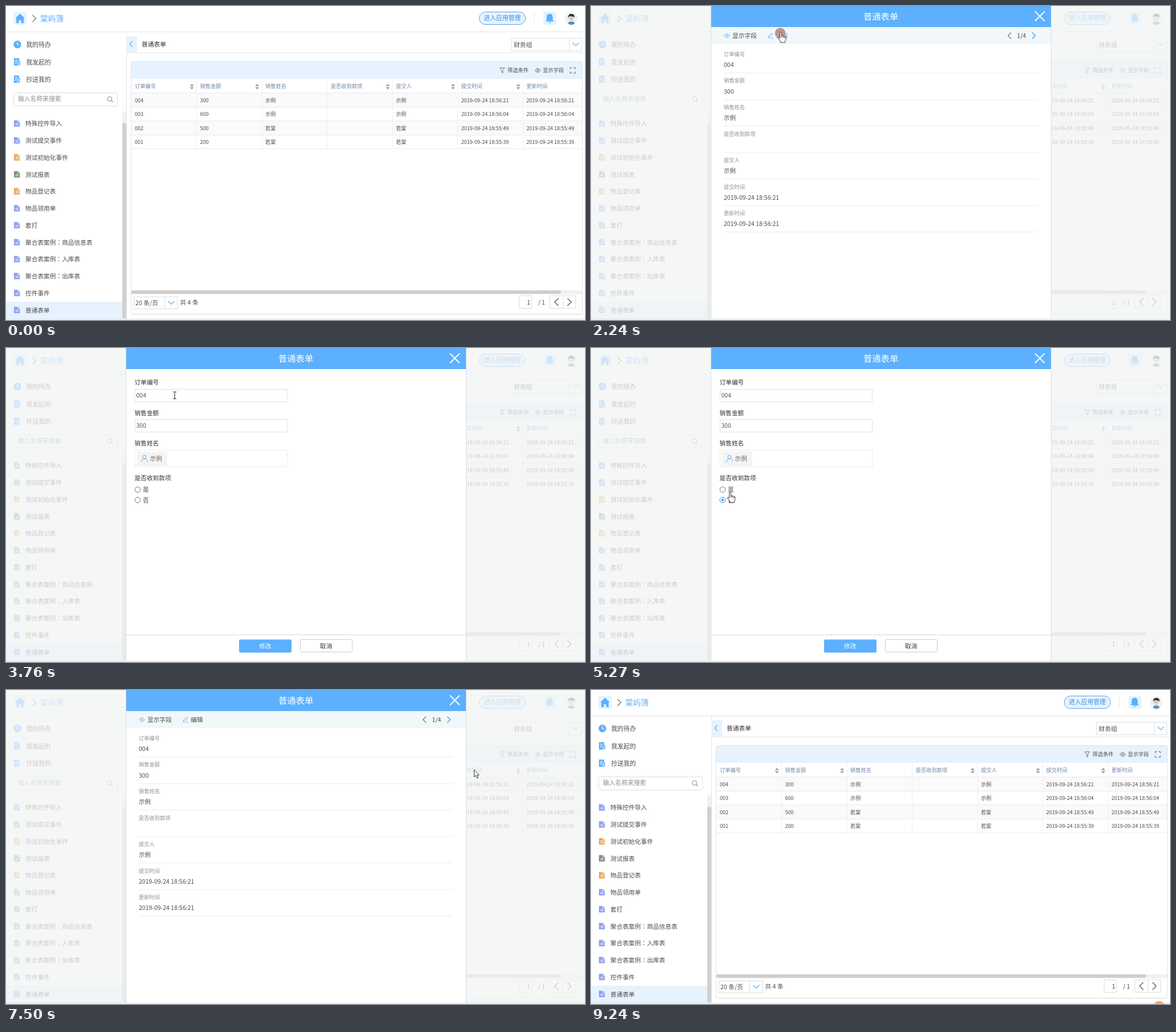
An HTML page that plays this animation: 1016 px wide and 551 px high, repeating every 9320 ms.

```html
<!DOCTYPE html>
<html lang="zh-CN">
<head>
<meta charset="utf-8">
<style>
html, body { margin: 0; width: 100%; height: 100%; overflow: hidden; background: #fff; }
svg { display: block; width: 1016px; height: 551px; font-family: "Noto Sans CJK SC", "Noto Sans CJK JP", "Noto Sans CJK", sans-serif; }
.mid { font-family: "Noto Sans CJK TC", "Noto Sans CJK", sans-serif; }
</style>
</head>
<body>
<svg id="stage" viewBox="0 0 1016 551"></svg>
<script>
const LOOP = 9320;
const BLUE = '#5cb0fe', PALE = '#e6f3fe', INK = '#4c4c4c', EDGE = '#dedede';

const rect = (x, y, w, h, fill, extra = '') =>
  `<rect x="${x}" y="${y}" width="${w}" height="${h}" fill="${fill}" ${extra}/>`;
const box = (x, y, w, h, stroke = EDGE, extra = '') =>
  rect(x + .5, y + .5, w - 1, h - 1, '#fff', `stroke="${stroke}" ${extra}`);
const path = (d, stroke, width = 1, fill = 'none', extra = '') =>
  `<path d="${d}" stroke="${stroke}" stroke-width="${width}" fill="${fill}" ${extra}/>`;
const solid = (d, fill) => path(d, 'none', 0, fill);
const circle = (x, y, r, fill, stroke = 'none', w = 1) =>
  `<circle cx="${x}" cy="${y}" r="${r}" fill="${fill}" stroke="${stroke}" stroke-width="${w}"/>`;
// y is the middle of the glyphs; the wide colon is centred in its cell
const text = (x, y, s, size = 10.7, fill = INK, extra = '') =>
  `<text x="${x}" y="${y + size * .37}" font-size="${size}" fill="${fill}" ${extra}>${
    s.replace('：', '<tspan class="mid" lang="zh-TW">：</tspan>')}</text>`;
const group = (x, y, body) => `<g transform="translate(${x} ${y})">${body}</g>`;
const hline = (x1, x2, y, color = '#ebebeb', extra = '') => path(`M${x1} ${y}H${x2}`, color, 1, 'none', extra);
const vline = (x, y1, y2, color = '#ebebeb') => path(`M${x} ${y1}V${y2}`, color);

const side = (x, y, dir, w, h, color, width = 1.2) =>
  path(`M${x - dir * w} ${y - h}L${x + dir * w} ${y}L${x - dir * w} ${y + h}`, color, width);
const down = (x, y) => path(`M${x - 5.5} ${y - 2.5}l5.5 5.5l5.5 -5.5`, BLUE, 1.2);
const eye = (x, y, color) =>
  path(`M${x - 5} ${y}q5 -7 10 0q-5 7 -10 0z`, color, .9) + circle(x, y, 1.6, 'none', color, .9);

function docIcon(y, kind) {
  const color = { form: '#8f9ff0', event: '#eca350', chart: '#83917f' }[kind];
  const marks = kind === 'chart'
    ? path('M3 9V7M5 9V4.5M7 9V6', '#fff', 1)
    : kind === 'event'
      ? path('M2.5 4.5H6M2.5 6.5H5M2.5 8.5H5', '#fff', .9) + circle(7.5, 7.2, 1.8, color, '#fff', .9)
      : path('M2.5 6H8M2.5 8.2H8', '#fff', .9);
  return group(14, y - 5.8, solid('M0 0H6.5V3.7H10.2V11.3H0Z', color) + solid('M7.4 0L10.2 2.9H7.4Z', color) + marks);
}

function topBar() {
  const house = solid('M24.5 13.5L33 21.5H31V30H26.5V25H22.5V30H18V21.5H16Z', BLUE);
  const bell = solid('M954 13.5c-3.8 0-5.4 3-5.4 6v5l-1.8 2.5h14.4l-1.8-2.5v-5c0-3-1.6-6-5.4-6z', BLUE) +
    solid('M951.5 28h5q-2.5 3.6-5 0z', BLUE);
  const face = circle(992, 22, 11, PALE) + solid('M986.2 31q.8-3.6 4-4h3.6q3.2.4 4 4q-5.8 3.8-11.6 0z', '#4d8fce') +
    rect(990.3, 24, 3.4, 4, '#f3c09e') + circle(992, 21.3, 4.8, '#fad2b4') +
    solid('M986.6 20.6q-.8-6.6 5.4-6.8q6.3.2 5.5 6.8l-1.4-2q-4 .3-5.9-1l-2.2 1.2z', '#353235') +
    circle(990.2, 21.6, .6, '#444') + circle(993.8, 21.6, .6, '#444');
  return hline(0, 1016, 45, '#e3e5e7') + hline(0, 1016, 46, '#f3f4f5') +
    rect(13, 10, 23, 23, PALE, 'rx="3"') + house +
    side(49.5, 22, 1, 3, 6, '#777', 1.3) + text(60, 22, '棠屿簿', 13.8, '#64b2fa') +
    rect(830.5, 10.5, 81, 22, PALE, 'rx="11" stroke="#559fe9"') +
    text(838.5, 21.5, '进入应用管理', 10.8, '#3c8de0') +
    vline(927, 11, 33, '#dceaf6') + rect(943, 10, 23, 23, PALE, 'rx="3"') + bell + face;
}

function sidebar() {
  const items = ['特殊控件导入', '测试提交事件', '测试初始化事件', '测试报表', '物品登记表', '物品领用单', '套打',
    '聚合表案例：商品信息表', '聚合表案例：入库表', '聚合表案例：出库表', '控件事件', '普通表单'];
  const kinds = { 2: 'event', 3: 'chart', 4: 'event' };
  const sheet = 'M14 0H23V5H25V13H14Z';
  const marks = path('M16 3.5H21M16 6H20M16 8.5H19', '#fff', 1);
  return vline(211.5, 46, 549, '#e2e4e6') +
    circle(20, 67.5, 6.7, BLUE) + path('M20 63.5V68H23.5', '#fff', 1.2) +
    group(0, 91.5, solid(sheet, BLUE) + marks + path('M23 7v6M20 10h6', '#fff', 3) + path('M23 7.5v5M20.5 10h5', BLUE, 1.3)) +
    group(0, 122, solid(sheet, BLUE) + marks + circle(22.5, 8.3, 2, BLUE, '#fff') + path('M19.5 13q3-4 6 0', '#fff', 1.2)) +
    ['我的待办', '我发起的', '抄送我的'].map((s, i) => text(35.5, 68.5 + i * 30.5, s, 10.8)).join('') +
    box(13, 152, 183, 24, EDGE, 'rx="2"') + text(21, 163.5, '输入名称来搜索', 10.8, '#8a8f94') +
    circle(181.8, 163, 4, 'none', '#888') + path('M184.8 166l2.8 2.8', '#888', 1.1) +
    rect(204, 185, 7, 364, '#f1f1f1') + rect(204, 205, 7, 343, '#d0d0d0', 'rx="3"') +
    rect(0, 519, 204, 30, PALE) +
    items.map((s, i) => {
      const y = 206.5 + i * 29.75;
      return docIcon(y - .3, kinds[i] || 'form') + text(34, y, s);
    }).join('');
}

function table() {
  const cols = ['订单编号', '销售金额', '销售姓名', '是否收到款项', '提交人', '提交时间', '更新时间'];
  const rows = [['004', '300', '示例', '56:21'], ['003', '600', '示例', '56:04'],
    ['002', '500', '若棠', '55:49'], ['001', '200', '若棠', '55:39']];
  const colX = i => 226 + i * 114.55;
  let s = rect(219.5, 97.5, 792, 443, '#fff', 'stroke="#e2e4e6" rx="2"') + hline(220, 1011, 541.5, '#eceeef') +
    rect(220, 98, 791, 30, PALE);
  s += path('M866.5 108.5h8.5l-3.3 4.3v5l-2-1.5v-3.5z', '#666', .9) + text(880, 113, '筛选条件', 9.25) +
    eye(933, 113, '#666') + text(942, 113, '显示字段', 9.25) +
    path('M990 111v-3h3M996 108h3v3M999 115v3h-3M993 118h-3v-3', '#666', 1);
  rows.forEach((r, i) => { if (i % 2 === 0) s += rect(220, 153 + i * 24.5, 791, 24, '#fafafa'); });
  for (let i = 0; i < 5; i++) s += hline(220, 1011, Math.round(152 + i * 24.5) + .5);
  cols.forEach((c, i) => {
    s += text(colX(i), 141, c, 9.25, '#6f86a6');
    if (i < 6) {
      const x = colX(i + 1) - 6.5;
      s += vline(Math.round(x) + .5, 128, 250, '#efefef');
      if (i !== 2) s += solid(`M${x - 11.5} 140.6l3.6-3.8l3.6 3.8zM${x - 11.5} 142.4l3.6 3.8l3.6-3.8z`, '#999');
    }
  });
  rows.forEach(([id, sum, name, time], i) => {
    const stamp = '2019-09-24 18:' + time;
    [id, sum, name, '', name, stamp, stamp].forEach((v, c) => { s += text(colX(c), 165.5 + i * 24.4, v, 9.05); });
  });
  return s;
}

function panel() {
  return rect(211, 53, 19, 28, PALE) + side(219.5, 67, -1, 2.5, 5, BLUE) +
    text(238, 67.5, '普通表单', 10.75, '#333') + hline(212, 1016, 82, '#e2e4e6') +
    box(887, 56, 124, 23) + vline(988.5, 56, 79, EDGE) + text(891, 68, '财务组') + down(1000, 67) +
    table() +
    rect(220, 499, 791, 7, '#f1f1f1') + rect(220, 499, 754, 6, '#cecece', 'rx="3"') +
    box(224, 510, 77, 22) + vline(278.5, 510, 532, EDGE) + text(227, 521, '20 条/页') + down(290, 520.5) +
    text(305.5, 520, '共 4 条') +
    box(900, 508, 23, 23) + text(914, 520, '1') + text(933.5, 520, '/ 1') +
    box(954, 508, 24, 23) + box(977, 508, 23, 23) +
    side(966, 519.5, -1, 3.3, 6.5, '#555') + side(988.5, 519.5, 1, 3.3, 6.5, '#555');
}

function shell() {
  return rect(0, 0, 1016, 549, '#f3f5f5', 'opacity=".77"') + rect(210, 0, 598, 549, '#d9dddf') +
    rect(211, 0, 596, 549, '#fff') + rect(211, 0, 596, 37, BLUE) +
    text(478, 18, '普通表单', 15.3, '#fff') + path('M779 9.5l17 17M796 9.5l-17 17', '#fff', 1.8);
}

function detail() {
  const stamp = '2019-09-24 18:56:21';
  const fields = [['订单编号', '004'], ['销售金额', '300'], ['销售姓名', '示例'], ['是否收到款项', ''],
    ['提交人', '示例'], ['提交时间', stamp], ['更新时间', stamp]];
  return rect(211, 37, 596, 30, '#f2f8fa') + eye(238.5, 52, BLUE) + text(248, 52, '显示字段', 10.75) +
    path('M310.5 56l1-3.3l5.4-5.4l2.2 2.2l-5.4 5.4zM315 56.8h5', BLUE, 1) +
    text(324, 52, '编辑', 10.75, INK, 'id="edit"') +
    side(734.5, 52, -1, 2.8, 5.5, '#777') + text(747.5, 52, '1/4') + side(777, 52, 1, 2.8, 5.5, '#3f9ff5', 1.4) +
    fields.map(([k, v], i) => {
      const y = i * 46.55;
      return text(233, 84.5 + y, k, 9.25, '#909090') + text(233, 103.3 + y, v, 10.5) +
        hline(233, 784, Math.round(117 + y) + .5, '#ededed');
    }).join('');
}

function form() {
  const label = (y, s) => text(225.5, y, s, 10.7, '#333', 'font-weight="500"');
  const field = (y, s) => box(226, y, 268, 23, '#e2e2e2') + text(228.5, y + 11.5, s, 10.5, '#555');
  return label(60.5, '订单编号') + field(72, '004') + label(114, '销售金额') + field(125, '300') +
    label(167.5, '销售姓名') + box(226, 179, 268, 30, '#dedede', 'stroke-dasharray="3 2"') +
    rect(230, 182, 53, 25, '#f4f4f4', 'rx="2"') + circle(243, 191.3, 3, 'none', BLUE) +
    path('M237.5 200q.5-5.5 5.5-5.5t5.5 5.5', BLUE, 1) + text(252.5, 194.5, '示例', 10.7, '#666') +
    label(228.5, '是否收到款项') +
    circle(231, 248.5, 4.8, '#fff', '#777') + text(240, 248.5, '是') +
    circle(231, 266.8, 4.8, '#fff', '#777') + text(240, 266.8, '否') +
    `<g id="pick">${circle(231, 266.8, 4.8, '#fff', '#3f9ff5')}${circle(231, 266.8, 2.2, '#3f9ff5')}</g>` +
    hline(211, 807, 503.5, '#bbb', 'stroke-dasharray="2 1.5"') +
    rect(409, 511.5, 92, 23, BLUE, 'rx="2"') + text(444, 523, '修改', 10.7, '#fff') +
    box(516, 511, 92, 23, '#ccc', 'rx="2"') + text(551, 523, '取消', 10.7, '#333');
}

const pointers = {
  arrow: path('M0 0V12.5L3 9.8L5.2 14.8L7.2 13.9L5 9.2H8.8Z', '#222', .9, '#fff'),
  hand: path('M-1.4 9.5V1.2Q-1.4 0 0 0T1.5 1.2V6.3Q3.5 5.2 4.2 6.8Q6 6 6.6 7.5Q8.8 7 8.9 9V12.5Q8.5 14.5 7.5 15.5V18H-.5V16Q-3.8 12 -4.8 9.7Q-3.6 7.6 -1.4 10.5ZM1.5 6V9.5M4.2 7V10M6.6 7.8V10.5', '#222', .9, '#fff'),
  beam: path('M-3 -6H-.8L0 -5.3L.8 -6H3M-3 6H-.8L0 5.3L.8 6H3M0 -5.3V5.3', '#333', 1.1)
};

const layer = (id, body) => `<g id="${id}">${body}</g>`;
document.getElementById('stage').innerHTML =
  rect(0, 0, 1016, 551, '#fff') + topBar() + sidebar() + panel() +
  layer('shell', shell()) + layer('detail', detail()) + layer('form', form()) +
  hline(0, 1016, 549.5, '#d8dadb') + layer('tap', circle(0, 0, 9.3, 'currentColor')) +
  layer('cursor', Object.keys(pointers).map(k => layer(k, pointers[k])).join(''));

// time, x, y, pointer shown from then on
const moves = [
  [150, 997, 549, 'arrow'], [870, 370, 163, 'arrow'], [1600, 370, 163, 'arrow'], [2160, 333, 46, 'hand'],
  [2800, 333, 46, 'arrow'], [3000, 326, 56, 'arrow'], [3250, 312, 75, 'beam'], [3760, 296, 83, 'beam'],
  [3920, 290, 98, 'arrow'], [4480, 244, 263, 'hand'], [4720, 244, 263, 'hand'], [5270, 244, 253, 'hand'],
  [5590, 250, 262, 'arrow'], [6460, 455, 521, 'hand'], [6860, 455, 521, 'arrow'], [7500, 821.5, 140, 'arrow'],
  [7980, 788, 17, 'hand'], [8370, 788, 17, 'arrow'], [9000, 997, 555, 'arrow'], [LOOP, 997, 555, 'arrow']
];
const taps = [
  [920, 1030, 370, 163, '#f59a8a'], [2200, 2320, 332, 47.5, '#c4938d'], [4560, 4640, 244, 263, '#f59a8a'],
  [6620, 6700, 455, 521, '#f59a8a'], [8130, 8210, 788, 17, '#f59a8a'], [9240, LOOP, 997, 555, '#f6a46c']
];

const el = id => document.getElementById(id);
const show = (id, on) => el(id).setAttribute('display', on ? 'inline' : 'none');
const place = (id, x, y) => el(id).setAttribute('transform', `translate(${x} ${y})`);
const within = (t, a, b) => t >= a && t < b;

function draw(t) {
  show('shell', within(t, 1030, 8370));
  show('detail', within(t, 1600, 2640) || within(t, 6860, 8370));
  show('form', within(t, 2640, 6860));
  show('pick', within(t, 4640, 6860));
  el('edit').setAttribute('fill', within(t, 2160, 2640) ? BLUE : INK);

  show('cursor', within(t, 150, 9000));
  const i = moves.findIndex((m, n) => n + 1 < moves.length && within(t, m[0], moves[n + 1][0]));
  if (i >= 0) {
    const [t0, x0, y0, kind] = moves[i], [t1, x1, y1] = moves[i + 1];
    const p = (t - t0) / (t1 - t0), e = p * p * (3 - 2 * p);
    place('cursor', x0 + (x1 - x0) * e, y0 + (y1 - y0) * e);
    for (const k in pointers) show(k, k === kind);
  }
  const tap = taps.find(([a, b]) => within(t, a, b));
  show('tap', tap);
  if (tap) {
    place('tap', tap[2], tap[3]);
    el('tap').setAttribute('color', tap[4]);
  }
}

const start = performance.now();
function tick() {
  draw((performance.now() - start) % LOOP);
  requestAnimationFrame(tick);
}
draw(0);
requestAnimationFrame(tick);
</script>
</body>
</html>
```
